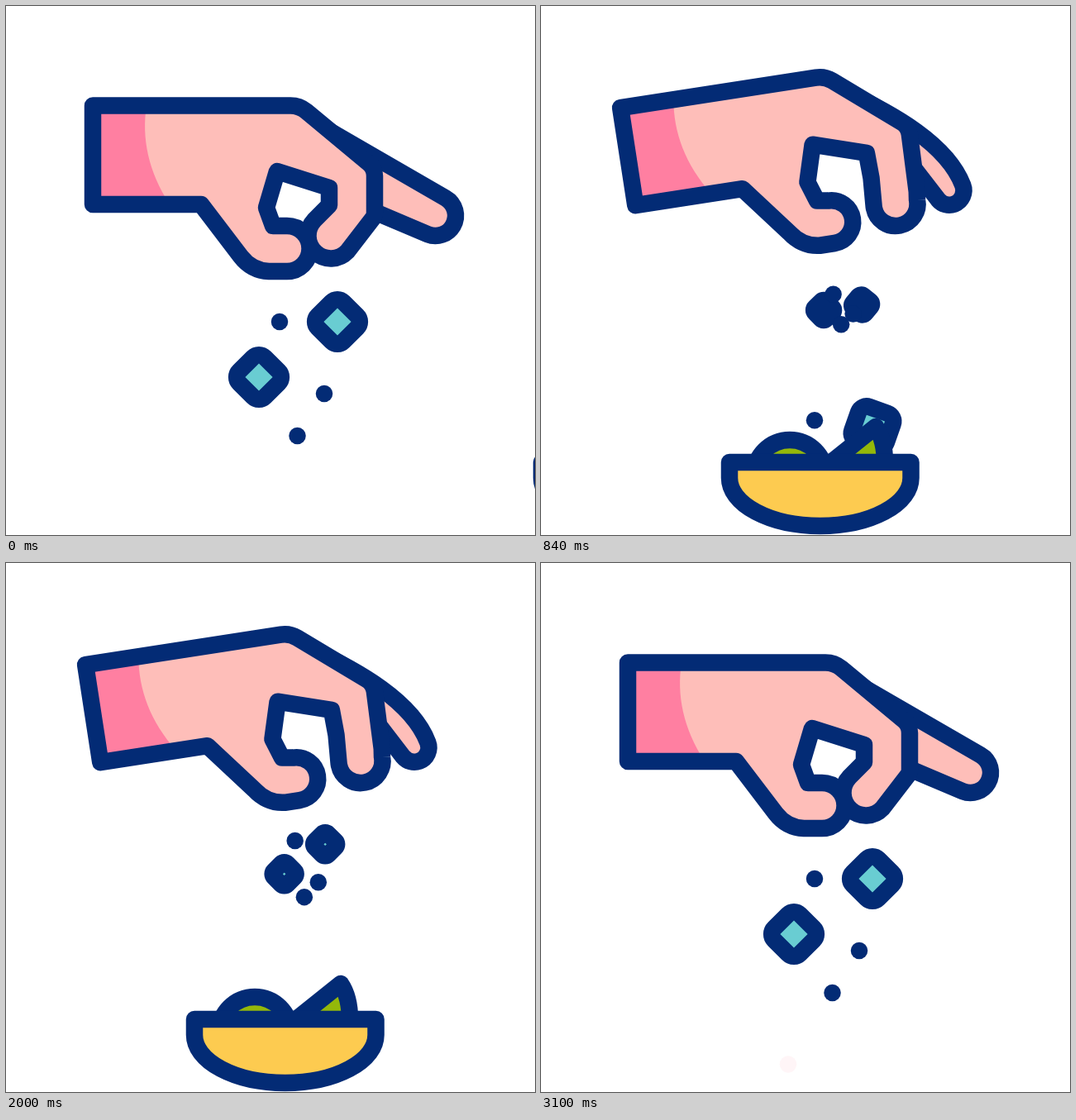
An HTML page with a canvas for the animation above (3.4 s loop, 640 by 640 pixels).

```html
<!DOCTYPE html>
<html lang="en">
<head>
<meta charset="utf-8">
<title>Seasoning a bowl</title>
<style>
html, body { margin: 0; width: 100%; height: 100%; overflow: hidden; background: #fff; }
canvas { display: block; }
</style>
</head>
<body>
<canvas id="stage" width="640" height="640"></canvas>
<script>
const ctx = document.getElementById('stage').getContext('2d');
const LOOP = 3400, WIDTH = 20.5, RAD = Math.PI / 180;
const NAVY = '#032b75', SKIN = '#febeb9', CUFF = '#ff7fa1',
      TEAL = '#69cdd2', YELLOW = '#fdcb50', GREEN = '#94b80a';

const ramp = (t, a, b) => Math.min(1, Math.max(0, (t - a) / (b - a)));
const ease = (t, a, b) => (1 - Math.cos(Math.PI * ramp(t, a, b))) / 2;
const easeOut = (t, a, b) => Math.sin(Math.PI / 2 * ramp(t, a, b));
const mix = (a, b, k) => a + (b - a) * k;

// Grains: resting place, height of origin, spin, sideways drift, fall start in each batch
const grains = [
  { x: 401, y: 382, from: 295, cube: true, spin: -1, drift: .12, starts: [224, 648] },
  { x: 306, y: 449, from: 297, cube: true, spin: 1, drift: -.1, starts: [279, 800] },
  { x: 331, y: 382, from: 286, drift: 0, starts: [255, 690] },
  { x: 385, y: 469, from: 296, drift: 0, starts: [307, 843] },
  { x: 352.5, y: 520, from: 278, drift: 0, starts: [320, 880] }
];

function paint(fill) {
  ctx.fillStyle = fill;
  ctx.fill();
  ctx.stroke();
}

function drawCube(x, y, size, turn) {
  const half = 22 * size;
  ctx.save();
  ctx.translate(x, y);
  ctx.rotate((45 + turn) * RAD);
  ctx.beginPath();
  ctx.roundRect(-half, -half, 2 * half, 2 * half, 10.25 * size);
  paint(TEAL);
  ctx.restore();
}

function drawDot(x, y) {
  ctx.beginPath();
  ctx.arc(x, y, 10.25, 0, 2 * Math.PI);
  ctx.fillStyle = NAVY;
  ctx.fill();
}

// Spreads a batch out of the fingers by factor k, then lets each grain drop.
function drawBatch(t, k, batch, originX = 370, lift = 0) {
  for (const g of grains) {
    const wait = batch < 2 ? Math.max(0, t - g.starts[batch]) : 0;
    const fall = .0301 * wait ** 1.3;
    const x = mix(originX, g.x, k) + (batch === 1 ? g.drift * fall : 0);
    const y = Math.min(585, mix(g.from - lift, g.y, k) + fall);
    if (g.cube) drawCube(x, y, k, g.spin * Math.min(fall, 200) * .2);
    else drawDot(x, y);
  }
}

function drawGrains(t) {
  if (t < 1400) drawBatch(t, 1, 0);
  if (t > 540 && t < 2000) {
    const k = easeOut(t, 540, 1000);
    drawBatch(t, .52 * k, 1, mix(382, 370, k), mix(5, 0, k));
  }
  if (t > 1682) drawBatch(t, easeOut(t, 1682, 2596), 2);
}

function drawBowl(t) {
  const shift = 420 * (1 - ease(t, 0, 530)) - 470 * ease(t, 2302, 2745);
  if (shift < -465) return;
  ctx.save();
  ctx.translate(shift, 0);
  ctx.beginPath();
  ctx.arc(301, 568, 43, Math.PI, 2 * Math.PI);
  paint(GREEN);
  ctx.beginPath();
  ctx.moveTo(350, 553);
  ctx.lineTo(405, 509);
  ctx.quadraticCurveTo(416, 525, 416, 553);
  paint(GREEN);
  ctx.beginPath();
  ctx.moveTo(228, 552);
  ctx.lineTo(447.5, 552);
  ctx.ellipse(337.75, 571, 109.75, 58, 0, 0, Math.PI);
  ctx.closePath();
  paint(YELLOW);
  ctx.restore();
}

function drawStreak(t, x, y, reach, tilt, late, faint) {
  if (t < 2300) return;
  const fade = ease(t, 2780, 3080 + late);
  const head = x - reach * ease(t, 2300, 2830);
  const tail = x - reach * ease(t, 2620, 3080 + late);
  ctx.beginPath();
  ctx.moveTo(tail + .01, y);
  ctx.lineTo(head, y + tilt);
  ctx.strokeStyle = `rgba(254,${mix(203, 130, fade)},${mix(80, 150, fade)},${mix(1, faint, fade)})`;
  ctx.stroke();
  ctx.strokeStyle = NAVY;
}

function drawStreaks(t) {
  drawStreak(t, 480, 552, 182, 1, -20, 0);
  drawStreak(t, 534, 576.5, 156, 0, -20, 0);
  drawStreak(t, 430, 606.5, 131, 0, 20, .08);
}

function drawPointer(bend) {
  const to = (a, b) => mix(a, b, bend);
  const tipX = to(519.5, 483), tipY = to(253.5, 280), tipR = to(24.5, 17.5);
  const from = mix(-60, -12, bend * bend) * RAD, until = to(112, 149) * RAD;
  const cos = Math.cos(from), sin = Math.sin(from), pull = to(48, 53);
  const endX = tipX + tipR * cos, endY = tipY + tipR * sin;

  ctx.beginPath();
  ctx.moveTo(377, 143);
  ctx.bezierCurveTo(430, to(173.6, 178), endX + pull * sin, endY - pull * cos, endX, endY);
  ctx.arc(tipX, tipY, tipR, from, until);
  ctx.lineTo(446, 249);
  paint(SKIN);
}

function drawPalm(open) {
  const to = (a, b) => mix(a, b, open);
  const kinkX = to(446, 444), kinkY = to(254, 276);
  const tipX = to(393, 417), tipY = to(278, 286.5), tipR = to(27.5, 26.5);
  const from = to(43, -4) * RAD, until = to(224, 184) * RAD;
  const thumbX = to(340, 336), thumbY = to(293.5, 296), thumbR = to(27.5, 26);

  ctx.beginPath();
  ctx.moveTo(105, 120.5);
  ctx.arcTo(355, 120.5, 446, 196, 30);
  ctx.arcTo(446, 196, kinkX, kinkY, 20);
  ctx.arcTo(kinkX, kinkY, tipX + tipR * Math.cos(from), tipY + tipR * Math.sin(from), 12);
  ctx.arc(tipX, tipY, tipR, from, until);
  ctx.lineTo(to(391, 392), to(241, 251));
  ctx.lineTo(391, 220);
  ctx.lineTo(328, 200);
  ctx.lineTo(315, 244);
  ctx.lineTo(323, to(266, 268));
  ctx.arc(thumbX, thumbY, thumbR, -Math.PI / 2, Math.PI / 2);
  ctx.lineTo(318, thumbY + thumbR);
  ctx.quadraticCurveTo(297, 320, 284, to(303, 301));
  ctx.lineTo(236, 240);
  ctx.lineTo(105, 240);
  ctx.closePath();
  ctx.fillStyle = SKIN;
  ctx.fill();
  ctx.fillStyle = CUFF;
  ctx.fill(new Path2D('M105 120H170C164 160 172 200 198 240H105Z'));
  ctx.stroke();
}

function drawHand(t) {
  const open = ease(t, 205, 775) - ease(t, 775, 1390)
             + ease(t, 1395, 2075) - ease(t, 2075, 2728);
  const bend = ease(t, 100, 790) - ease(t, 2090, 2740);
  ctx.save();
  ctx.translate(117, 180);
  ctx.rotate(-9 * open * RAD);
  ctx.translate(-117, -180);
  drawPointer(bend);
  drawPalm(open);
  ctx.restore();
}

function draw(now) {
  const t = now % LOOP;
  ctx.fillStyle = '#fff';
  ctx.fillRect(0, 0, 640, 640);
  ctx.lineWidth = WIDTH;
  ctx.lineCap = ctx.lineJoin = 'round';
  ctx.strokeStyle = NAVY;
  drawGrains(t);
  drawStreaks(t);
  drawBowl(t);
  drawHand(t);
  requestAnimationFrame(draw);
}
requestAnimationFrame(draw);
</script>
</body>
</html>
```
